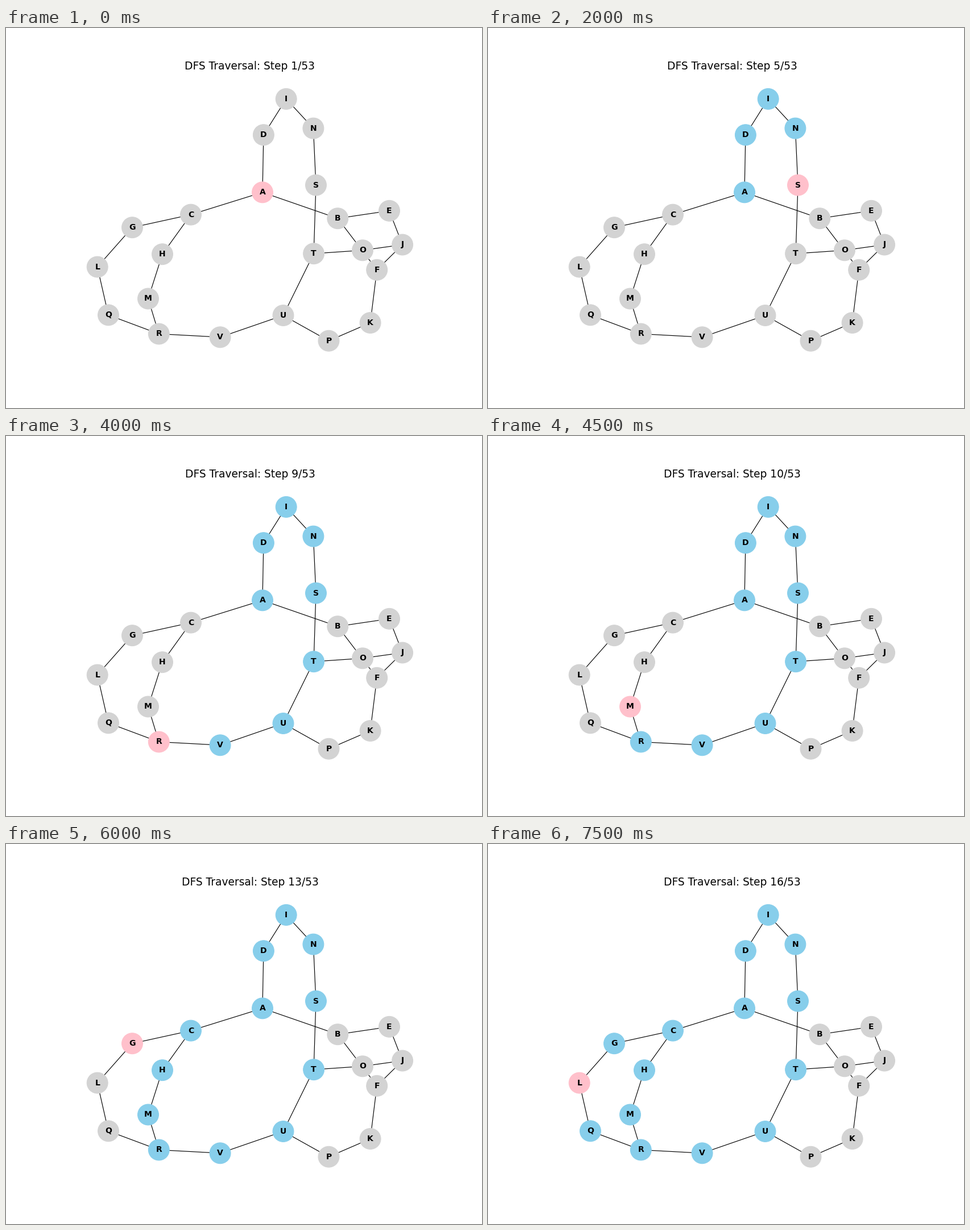
A matplotlib script for the animation above (8 s loop, 837 px wide and 669 px high).

```python
import matplotlib.pyplot as plt
from matplotlib.animation import FuncAnimation

W, H, DPI = 837, 669, 96
SCALE = 83.7 / DPI  # point sizes below assume 83.7 dpi
STEPS = 53
PATH = "ADINSTUVRMHCGLQL"

POS = {
    "A": (451, 289.3), "B": (583.3, 335.2), "C": (325, 328.6),
    "D": (452.9, 188.2), "E": (674, 321.8), "F": (652.2, 425.8),
    "G": (222, 351.2), "H": (275, 398.2), "I": (492.7, 124.9),
    "J": (697.1, 381.5), "K": (640.6, 519), "L": (160.7, 420.6),
    "M": (250, 476.5), "N": (540.4, 176.6), "O": (627, 391.3),
    "P": (567.5, 550.7), "Q": (180, 505.3), "R": (268.8, 538.5),
    "S": (545, 276.6), "T": (541.1, 397.2), "U": (487.5, 506),
    "V": (376.6, 544.3),
}
EDGES = ("AB AC AD BE BF CG CH DI EJ FJ FK GL HM IN JO KP LQ "
         "MR NS OT PU QR RV ST TU UV").split()

plt.rcParams["font.family"] = "DejaVu Sans"
fig = plt.figure(figsize=(W / DPI, H / DPI), dpi=DPI, facecolor="white")
ax = fig.add_axes([0, 0, 1, 1])
ax.set_xlim(0, W)
ax.set_ylim(H, 0)
ax.axis("off")

for a, b in EDGES:
    ax.plot(*zip(POS[a], POS[b]), color="black", lw=SCALE, zorder=1)

nodes = ax.scatter(*zip(*POS.values()), s=1000 * SCALE**2,
                   linewidths=SCALE, zorder=2)
for name, (x, y) in POS.items():
    ax.text(x, y, name, size=12 * SCALE, weight="bold",
            ha="center", va="center", zorder=3)

title = ax.text(0.5125 * W, 73.3, "", size=16 * SCALE,
                ha="center", va="baseline")


def node_color(name, step):
    if name == PATH[step]:
        return "pink"
    return "skyblue" if name in PATH[:step] else "lightgray"


def update(step):
    nodes.set_color([node_color(name, step) for name in POS])
    title.set_text(f"DFS Traversal: Step {step + 1}/{STEPS}")
    return nodes, title


anim = FuncAnimation(fig, update, frames=len(PATH), interval=500,
                     repeat=True, repeat_delay=0)
plt.show()
```
